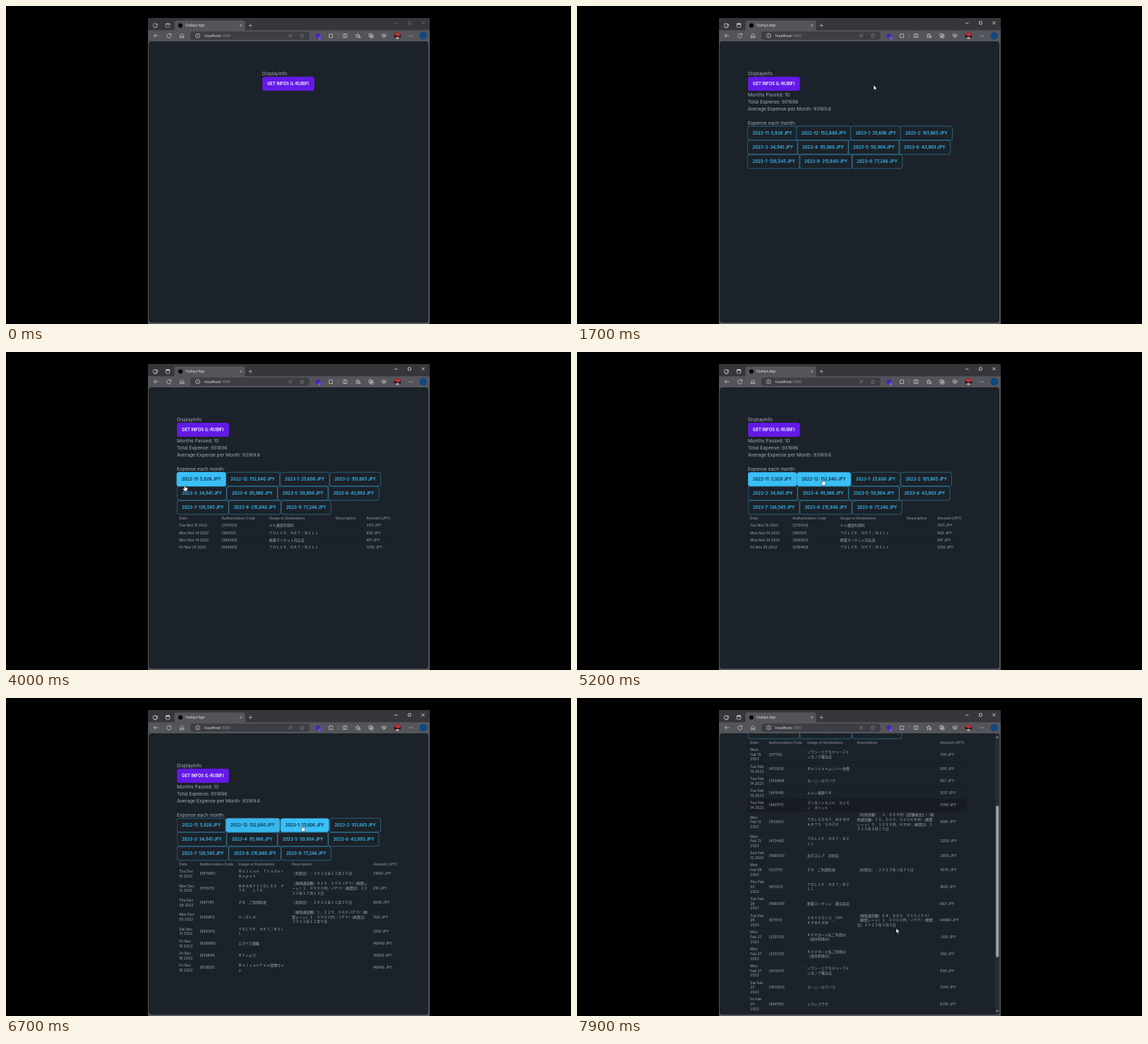
Animation, 800 px wide and 450 px high, one loop 8000 ms. Source, as an HTML page:

```html
<!DOCTYPE html>
<html lang="ja">
<head>
<meta charset="utf-8">
<title>Outlays App</title>
<style>
  @property --pop { syntax: "<number>"; inherits: false; initial-value: 1; }
  html, body { margin: 0; width: 100%; height: 100%; overflow: hidden; background: #000; }
  body { position: relative; }
  svg { position: absolute; left: 0; top: 0; }
  .view {
    position: absolute; left: 202.4px; top: 50px; width: 396px; height: 398.3px;
    overflow: hidden; border-radius: 4px; background: #1c2229;
  }
  /* The page is laid out at full size and shown at 5/12. */
  .zoom { width: 950px; transform: scale(.416667); transform-origin: 0 0; }
  .page {
    position: relative; top: 0; box-sizing: border-box; padding: 96px;
    font: 16px/24px Inter, "Noto Sans CJK JP", "Noto Sans CJK", sans-serif; color: #a6adbb;
    font-optical-sizing: none; text-spacing-trim: space-all;
  }
  .btn {
    box-sizing: border-box; display: inline-flex; align-items: center; height: 48px;
    padding: 0 16px; border: 1px solid #3abff8; border-radius: 8px;
    color: #3abff8; font-size: 14px; line-height: 14px; font-weight: 600;
    white-space: nowrap; scale: var(--pop);
  }
  .main { display: flex; width: max-content; background: #641ae6; border-color: #641ae6; color: #fff; }
  .months { display: flex; flex-wrap: wrap; width: 758px; }
  .tables { position: relative; font-size: 12px; line-height: 16px; }
  .table { position: absolute; left: 0; top: 0; }
  .row {
    display: grid; grid-template-columns: var(--cols); align-items: center;
    padding: 4px 0; border-bottom: 1px solid #191e24; white-space: pre;
  }
  .row span { padding: 0 8px; }
  .head { font-weight: 700; color: #747a85; }
</style>
</head>
<body>
<svg width="800" height="450" viewBox="0 0 800 450" fill="none" stroke="#d6d6d9" stroke-width=".7"
     font-family="Open Sans, Noto Sans, sans-serif">
  <defs><path id="star" d="M0-3 .9-.9 3-.8 1.4.6 1.9 2.8 0 1.6-1.9 2.8-1.4.6-3-.8-.9-.9z"/></defs>
  <g stroke="none">
    <rect x="201" y="17" width="399" height="433" fill="#37363b"/>
    <rect x="238.5" y="20.5" width="100" height="18" rx="3" fill="#54555a"/>
    <rect x="201" y="34.3" width="399" height="415.7" fill="#54555a"/>
    <rect x="261" y="36.3" width="168.5" height="11.5" rx="3" fill="#3d3e43"/>
    <circle cx="247" cy="27.5" r="3.1" fill="#000"/>
    <text x="254" y="29.3" font-size="4.8" fill="#f2f2f2">Outlays App</text>
    <text x="281" y="44" font-size="5.5" fill="#f4f4f4">localhost<tspan fill="#98989d">:3000</tspan></text>
  </g>
  <g id="tabIcons">
    <rect x="208.5" y="25" width="4.6" height="5" rx="1"/>
    <path d="M211 25.5h3.6v3.4l-1.8 1.8h-3"/>
    <rect x="226.4" y="24.8" width="5.4" height="5.4" rx=".7"/>
    <path d="M226.4 25.6h5.4" stroke-width="1.6"/>
  </g>
  <path d="M330.9 25.9l3.2 3.2m0-3.2l-3.2 3.2M343.4 27.5h5.4M346.1 24.8v5.4" stroke-width=".6"/>
  <g id="controls" stroke="#fff">
    <path d="M550 24.2h4.4M588.4 21.8l4.2 4.2m0-4.2l-4.2 4.2"/>
    <rect x="569.4" y="22" width="3.8" height="3.8" rx=".7"/>
  </g>
  <path d="M215.5 42h-6M212 39.3 209.3 42l2.7 2.7M233.3 40.6A3 3 0 1 0 233.7 42.6M233.7 38.8v2.2h-2.2M246.6 41.6l2.6-2.3 2.6 2.3v3.3h-1.7v-2h-1.8v2h-1.7z"/>
  <circle cx="271.5" cy="42" r="3"/>
  <path d="M271.5 41.5v2.1M271.5 40.1v.7"/>
  <g stroke="#85858b" stroke-width=".6">
    <path d="M400.3 44.5l2-5 2 5M401 43h2.6M404.6 39.4q.8.7.5 1.7"/>
    <use href="#star" x="419" y="42"/>
    <path d="M470.3 39v6"/>
  </g>
  <g stroke="none">
    <circle cx="441.5" cy="42" r="3.3" fill="#4a22b8"/>
    <rect x="442.4" y="42.8" width="4" height="4.4" rx=".8" fill="#5c30d8"/>
    <text x="443.2" y="46.6" font-size="4" fill="#fff">2</text>
    <circle cx="554.3" cy="42" r="5" fill="#2b191c"/>
    <path d="M549.6 40.5a5 5 0 0 1 9.4 0l-3 2.5-3.4-1z" fill="#b3353a"/>
    <path d="M551 45.6q3.3-3.5 6.6 0a5 5 0 0 1-6.6 0z" fill="#b9a6a0"/>
    <circle cx="590.8" cy="42" r="5.4" fill="#10487f"/>
    <g fill="#d6d6d9"><circle cx="571" cy="42" r=".6"/><circle cx="573.2" cy="42" r=".6"/><circle cx="575.4" cy="42" r=".6"/></g>
  </g>
  <path d="M457.5 39.8h1.7q.8-1.5 1.7 0h1.5v1.6q-1.6.7 0 1.6v1.7h-4.9z"/>
  <rect x="477" y="39.5" width="5.8" height="5" rx=".8"/><path d="M479.9 39v6"/>
  <use href="#star" x="498" y="42"/><path d="M500 43.2h2.2M500 45h2.2"/>
  <rect x="513.8" y="39.2" width="4.4" height="4.4" rx=".8"/><rect x="515.5" y="40.8" width="4.4" height="4.4" rx=".8"/>
  <path d="M517.7 41.9v2.2m-1.1-1.1h2.2"/>
  <path d="M535 45l-2.6-2.7q-.8-1.7.6-2.6 1.3-.4 2 .8.7-1.2 2-.8 1.4.9.6 2.6zM532.4 42.3h1.6l.8-1 1 2 .6-1h2"/>
</svg>

<div class="view"><div class="zoom"><div class="page" id="page">
  <div id="intro">DisplayInfo<div class="btn main" id="main">GET INFOS (L-RUBIF)</div></div>
  <div id="details">
    Months Passed: 10<br>Total Expense: 931696<br>Average Expense per Month: 93169.6<br><br>Expense each month:
    <div class="months" id="months"></div>
    <div class="tables" id="tables"></div>
  </div>
</div></div></div>

<svg width="800" height="450" viewBox="0 0 800 450">
  <g id="scrollbar">
    <path d="M592 50h3a3.4 3.4 0 0 1 3.4 3.4v391.5a3.4 3.4 0 0 1-3.4 3.4h-3z" fill="#2b2c2f"/>
    <path d="M593.4 56.4l1.8-2.6 1.8 2.6zM593.4 442l1.8 2.6 1.8-2.6z" fill="#9f9f9f"/>
    <rect id="thumb" x="593.2" y="60" width="4" height="214.5" rx="2" fill="#9f9f9f"/>
  </g>
  <g id="cursor" fill="#fff" stroke="#000" stroke-width=".4">
    <path id="arrow" d="M0 0V6.8l1.6-1.5 1 2.3 1-.4-1-2.3h2.2z"/>
    <path id="hand" d="M-.7.6Q0-.4.7.6V3.4L3.4 4Q4.3 4.3 4.1 5.4L3.4 8.8H-.6L-2.6 5.6Q-2.6 4.7-1.7 5l1 .9z"/>
    <path id="beam" d="M-1.3-3.4H1.3M0-3.4V3.4M-1.3 3.4H1.3" fill="none" stroke="#d8d8d8" stroke-width=".6"/>
  </g>
</svg>

<script>
const LOOP = 8000;
const $ = id => document.getElementById(id);

// stops: [ms, properties, easing towards the next stop], in order of time
function track(el, stops) {
  const frames = stops.map(([ms, props, easing = 'linear']) => ({ offset: ms / LOOP, easing, ...props }));
  const last = frames[frames.length - 1];
  el.animate([{ ...frames[0], offset: 0 }, ...frames, { ...last, offset: 1 }],
    { duration: LOOP, iterations: Infinity });
}

const hold = (el, ...stops) => track(el, stops.map(([ms, props]) => [ms, props, 'step-end']));

const show = (el, ...spans) => hold(el, [0, { opacity: 0 }],
  ...spans.flatMap(([from, to = LOOP]) => [[from, { opacity: 1 }], [to, { opacity: 0 }]]));

const popAt = at => [[at, .98], [at + 100, 1.02], [at + 250, 1]];
const press = (down, up) => [[down, 1], [down + 60, .976], [up - 5, .976], ...popAt(up)];
const pop = (el, stops) => track(el, stops.map(([ms, s]) => [ms, { '--pop': s }, 'ease-out']));

const paint = (bg, ink, border) => ({ backgroundColor: bg, color: ink, borderColor: border });
const outlined = paint('#1c2229', '#3abff8', '#3abff8');
const filled = paint('#3abff8', '#002b3d', '#3abff8');

function fill(el, on, off) {
  const stops = [[on, outlined], [on + 150, filled]];
  if (off) stops.push([off, filled], [off + 200, outlined]);
  track(el, stops);
}

function add(parent, className, text = '', tag = 'div') {
  const el = document.createElement(tag);
  el.className = className;
  el.textContent = text;
  return parent.appendChild(el);
}

// Month buttons
const months = ['2022-11: 5,928', '2022-12: 152,840', '2023-1: 25,606', '2023-2: 101,865',
  '2023-3: 34,941', '2023-4: 95,988', '2023-5: 50,904', '2023-6: 43,993',
  '2023-7: 126,545', '2023-8: 215,840', '2023-9: 77,246'];
const clicks = [[3800, 3880], [5600, 5690], [6640, 6780], [7430, 7510]];
const lit = [[3400, 5600], [5000, 6690], [6040, 7430], [7190], [3240, 3400]];

months.forEach((label, i) => {
  const btn = add($('months'), 'btn', label + ' JPY');
  pop(btn, [...popAt(1595), ...(clicks[i] ? press(...clicks[i]) : [])]);
  if (lit[i]) fill(btn, ...lit[i]);
});

// Tables: cells are split by ";", lines within a cell by "|"
const head = 'Date;Authorization Code;Usage or Destination;Description;Amount (JPY)';
const tables = [
  { span: [3890, 5690], width: 735, cols: '144px 161px 227px 104px 1fr', rows: `
    Tue Nov 15 2022;270433;ｎｅ通信利用料;;3511
    Mon Nov 14 2022;165051;ＴＯＬＶＥ．ＮＥＴ／ＢＩＬＬ;;800
    Mon Nov 14 2022;926593;星霧マーケット月丘店;;417
    Fri Nov 25 2022;636463;ＴＯＬＶＥ．ＮＥＴ／ＢＩＬＬ;;1200` },
  { span: [5690, 6790], width: 758, cols: '70px 131px 182px 276px 1fr', rows: `
    Thu Dec|15 2022;587665;Ｂｏｌｖａｎ　Ｔｒａｄｅｒ|Ｄｅｐｏｔ;（利用日）：２０２２年１２月１６日;21000
    Mon Dec|12 2022;913575;ＢＲＡＮＴＩＶＯＬＥＸ　Ｐ|ＴＥ．　ＬＴＤ．;（現地通貨額）６１０．０００ＪＰＹ/（換算レ|ート）１．００００円／ＪＰＹ/（換算日）２０|２２年１２月１３日;610
    Thu Dec|08 2022;497141;ＺＮ　ご利用料金;（利用日）：２０２２年１１月３０日;6006
    Mon Dec|05 2022;039951;Ｖ－ＯＬＵ;（現地通貨額）１，１２５．０００ＪＰＹ/（換|算レート）１．００００円／ＪＰＹ/（換算日）|２０２２年１２月６日;1125
    Sat Dec|31 2022;909301;ＴＯＬＶＥ．ＮＥＴ／ＢＩＬ|Ｌ;;1200
    Fri Dec|16 2022;839989;ムラベラ通販;;40649
    Fri Dec|16 2022;828841;ＲＹトルマ;;35800
    Fri Dec|16 2022;812605;ＢｏｌｖａｎＦｅｅ提携サイ|ト;;46450` },
  { span: [6790, 7480], width: 758, cols: '70px 131px 182px 276px 1fr', rows: `
    Sun Jan|15 2023;416208;星霧マーケット月丘店;;638
    Fri Jan|13 2023;730952;Ｂｏｌｖａｎ　Ｔｒａｄｅｒ|Ｄｅｐｏｔ;（利用日）：２０２３年１月１４日;9800
    Tue Jan|10 2023;558317;ＺＮ　ご利用料金;（利用日）：２０２２年１２月３１日;4270
    Sat Jan|07 2023;204496;ムラベラ通販;;9698
    Tue Jan|31 2023;871530;ＴＯＬＶＥ．ＮＥＴ／ＢＩＬ|Ｌ;;1200` },
  { span: [7480], width: 744, cols: '63px 130px 170px 282px 1fr', rows: `
    Wed|Feb 15|2023;017115;ソラン－ミナモヤリーフド|ンカノア霧丘店;;738
    Tue Feb|14 2023;412359;Ｂｏｌｖａｎメンバー会費;;500
    Tue Feb|14 2023;355949;モーニーカワゾラ;;567
    Tue Feb|14 2023;341549;ルメン東野ＳＫ;;1237
    Tue Feb|14 2023;480177;マンガノトモリヤ　ヨミモ|ノ　ポイント;;3740
    Mon|Feb 13|2023;152923;ＴＯＬＧＥＮＴ＿ＷＥＢＭ|ＡＲＴＳ　ＳＨＯＰ;（利用金額）：１，０９９円/【差額発生】/（現|地通貨額）１０，０００．０００ＫＲＷ/（換算|レート）０．１０９９円／ＫＲＷ/（換算日）２|０２３年２月１５日;1090
    Mon|Feb 13|2023;472485;ＴＯＬＶＥ．ＮＥＴ／ＢＩ|ＬＬ;;3200
    Sun Feb|12 2023;968929;北灯ストア　月砂店;;2900
    Mon|Feb 06|2023;122175;ＺＮ　ご利用料金;（利用日）：２０２３年１月３１日;4270
    Thu Feb|02|2023;811233;ＴＯＬＶＥ．ＮＥＴ／ＢＩ|ＬＬ;;1600
    Tue Feb|28|2023;966839;星霧マーケット　霧丘前店;;663
    Tue Feb|28|2023;671113;ＳＫＹＶＯＬＵ＿ＨＭ|Ｋ４ＢＥＲＷ;（現地通貨額）６４，８８０．０００ＪＰＹ/|（換算レート）１．００００円／ＪＰＹ/（換算|日）２０２３年３月２日;64880
    Mon|Feb 27|2023;220725;ＫＸＶカード払ご利用分|（海外利用分）;;-200
    Mon|Feb 27|2023;220725;ＫＸＶカード払ご利用分|（海外利用分）;;200
    Mon|Feb 27|2023;003937;ソラン－ミナモヤリーフド|ンカノア霧丘店;;939
    Sat Feb|25|2023;063303;モーニーカワゾラ;;1349
    Fri Feb|24|2023;464195;トワレプラザ;;6795` },
];

function addRow(table, cells, className = 'row') {
  const row = add(table, className);
  cells.forEach(text => add(row, '', text.replaceAll('|', '\n'), 'span'));
  return row;
}

tables.forEach(({ span, width, cols, rows }) => {
  const table = add($('tables'), 'table');
  table.style.width = width + 'px';
  table.style.setProperty('--cols', cols);
  addRow(table, head.split(';'), 'row head');
  rows.trim().split('\n').forEach(line => {
    const [date, code, use, note, sum] = line.trim().split(';');
    const row = addRow(table, [date, `[${code}]`, use, note, sum + ' JPY']);
    if (code === '480177') hold(row, [0, { backgroundColor: '#1c2229' }], [7670, { backgroundColor: '#181c22' }]);
  });
  show(table, span);
});

// Window focus, first request and its result
hold($('tabIcons'), [0, { opacity: .7 }], [800, { opacity: 1 }]);
hold($('controls'), [0, { opacity: .3 }], [800, { opacity: 1 }]);
hold($('intro'), [0, { translate: '290px 0' }], [1595, { translate: '0 0' }]);
show($('details'), [1595]);
pop($('main'), press(800, 880));
const idle = paint('#641ae6', '#fff', '#641ae6'), hover = paint('#5615c6', '#fff', '#5615c6');
track($('main'), [[600, idle], [750, hover], [1595, hover], [1700, idle],
  [2700, idle], [2850, hover], [3000, hover], [3100, idle]]);

// Scrolling
show($('scrollbar'), [7480]);
track($('page'), [[7690, { top: '0px' }, 'ease-out'], [7880, { top: '-412.8px' }]]);
track($('thumb'), [[7690, { translate: '0 0' }, 'ease-out'], [7880, { translate: '0 92.3px' }]]);

// Mouse
const path = [[200, 455, 240], [700, 420, 112], [2100, 420, 112], [2850, 295, 112], [2980, 295, 113],
  [3090, 294, 148], [3130, 293, 149], [3330, 262, 193], [3430, 253, 188], [4850, 253, 188],
  [5190, 348, 179.7], [5850, 348, 179.7], [6190, 419.5, 180], [6950, 419.5, 180],
  [7350, 521.5, 180.5], [7540, 521.5, 180.5], [7680, 452, 326]];
track($('cursor'), path.map(([ms, x, y]) => [ms, { translate: `${x}px ${y}px` }, 'ease-in-out']));
show($('arrow'), [200, 650], [1595, 2700], [7560]);
show($('hand'), [650, 1595], [2700, 3020], [3240, 7560]);
show($('beam'), [3020, 3240]);
</script>
</body>
</html>
```
